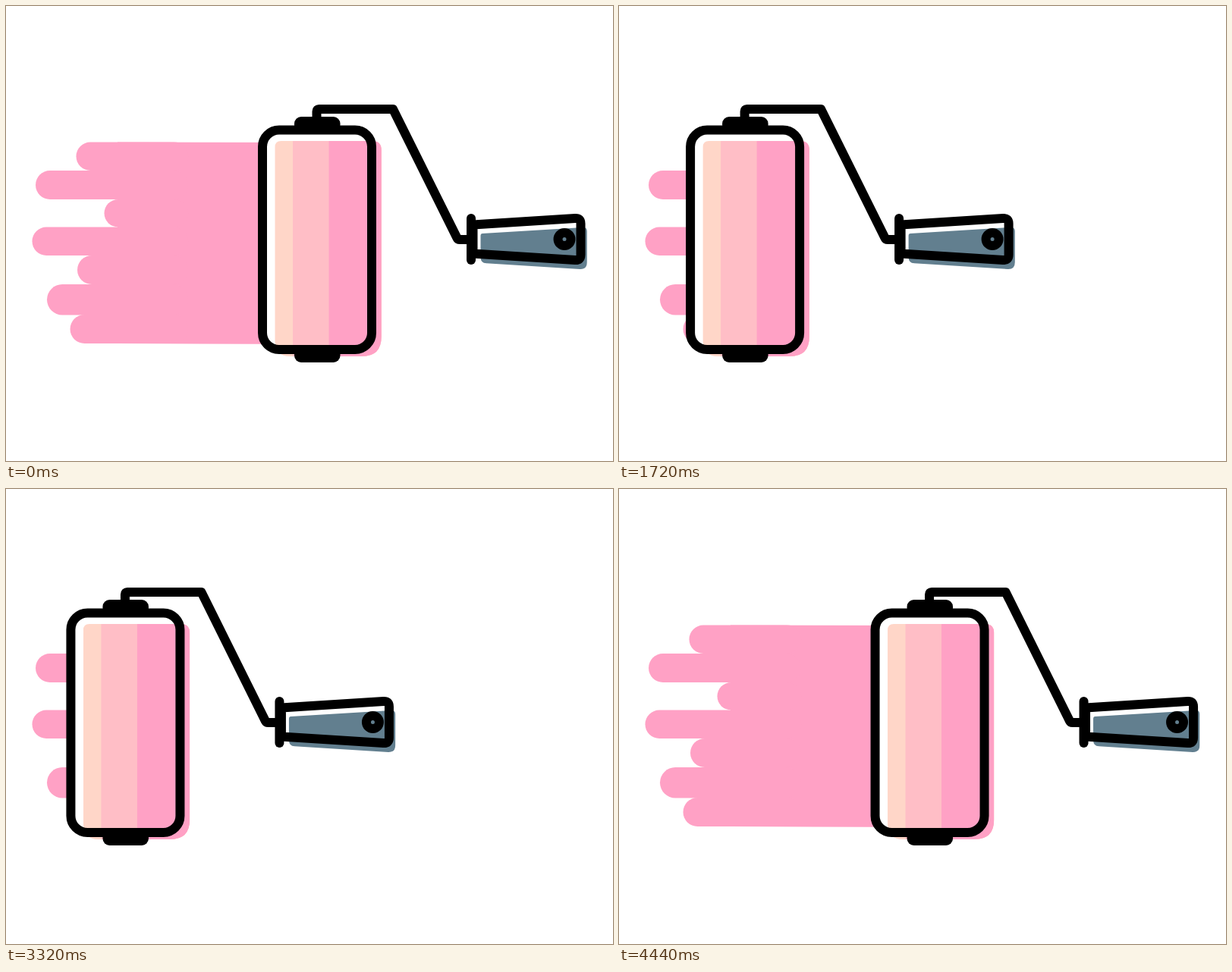
An HTML page for the animation above (4.48 s loop, 800 px wide and 600 px high).

```html
<!DOCTYPE html>
<html lang="en">
<head>
<meta charset="utf-8">
<title>Paint roller</title>
<style>
  html, body { margin: 0; width: 100%; height: 100%; overflow: hidden; background: #fff; }
  svg { display: block; width: 100vw; height: 100vh; }
  .line { fill: none; stroke: #000; stroke-width: 12; stroke-linecap: round; stroke-linejoin: round; }
</style>
</head>
<body>
<svg viewBox="0 0 800 600">
  <clipPath id="wet"><rect id="reach" width="410" height="600"/></clipPath>
  <clipPath id="coat">
    <path d="M362.500 178H483Q494.700 178 494.700 190V436Q494.700 462 469 462H374.500Q354.500 462 354.500 442V186Q354.500 178 362.500 178Z"/>
  </clipPath>

  <g id="paint" fill="#ffa1c5" clip-path="url(#wet)">
    <path d="M147 179.500L420 180V446L147 445Z"/>
  </g>

  <g id="roller">
    <rect x="338" y="163.500" width="144" height="289.500" rx="22" fill="#fff"/>
    <g clip-path="url(#coat)">
      <rect x="354" y="178" width="142" height="285" fill="#ffd6c8"/>
      <rect x="378" y="178" width="118" height="285" fill="#ffbec6"/>
      <rect x="425.500" y="178" width="71" height="285" fill="#ffa1c5"/>
    </g>
    <rect x="338" y="163.500" width="144" height="289.500" rx="22" class="line"/>
    <rect x="380" y="146" width="60.500" height="20" rx="9"/>
    <rect x="380" y="450" width="60.500" height="20" rx="9"/>
    <path class="line" d="M409.500 151V139Q409.500 136 412.500 136H510L594.500 306Q595.500 308 598 308H612"/>

    <path fill="#627f8f" d="M628 300L760 292Q765.700 291.500 765.700 297V338Q765.700 347.300 756.500 347L633 339.300Q625.500 339 625.500 331V303Q625.500 300 628 300Z"/>
    <path class="line" d="M615.500 288.500L750 280Q757.500 279.500 757.500 287V328Q757.500 335.500 750 335L615.500 326.500Z"/>
    <path class="line" d="M613 280V335"/>
    <circle class="line" cx="736" cy="307.500" r="8.500"/>
  </g>
</svg>
<script>
const LOOP = 4480, TRAVEL = 302, MOVE = 1770, OUT = 599, BACK = 2744;
const $ = id => document.getElementById(id);

// Ragged paint edge: left, top, bottom of each streak
[[92.5, 179.5, 217], [39, 217, 255], [129.5, 255, 291.5], [34.5, 291.5, 329],
 [94, 329, 367], [54, 367, 407.5], [84.5, 407, 445]].forEach(([x, top, bottom]) => {
  const bar = document.createElementNS("http://www.w3.org/2000/svg", "rect");
  const set = { x, y: top, width: 240 - x, height: bottom - top, rx: (bottom - top) / 2 };
  for (const key in set) bar.setAttribute(key, set[key]);
  $("paint").append(bar);
});

// cubic-bezier(.6, 0, .367, 1), solved by bisection
function ease(x) {
  if (x <= 0) return 0;
  if (x >= 1) return 1;
  let low = 0, high = 1, u;
  for (let i = 0; i < 24; i++) {
    u = (low + high) / 2;
    const v = 1 - u;
    if (3 * .6 * u * v * v + 3 * .367 * u * u * v + u * u * u < x) low = u;
    else high = u;
  }
  return u * u * (3 - 2 * u);
}

const start = performance.now();
function draw() {
  const t = (performance.now() - start) % LOOP;
  const shift = TRAVEL * (ease((t - BACK) / MOVE) - ease((t - OUT) / MOVE));
  $("roller").setAttribute("transform", `translate(${shift})`);
  $("reach").setAttribute("width", 410 + shift);
  requestAnimationFrame(draw);
}
draw();
</script>
</body>
</html>
```
